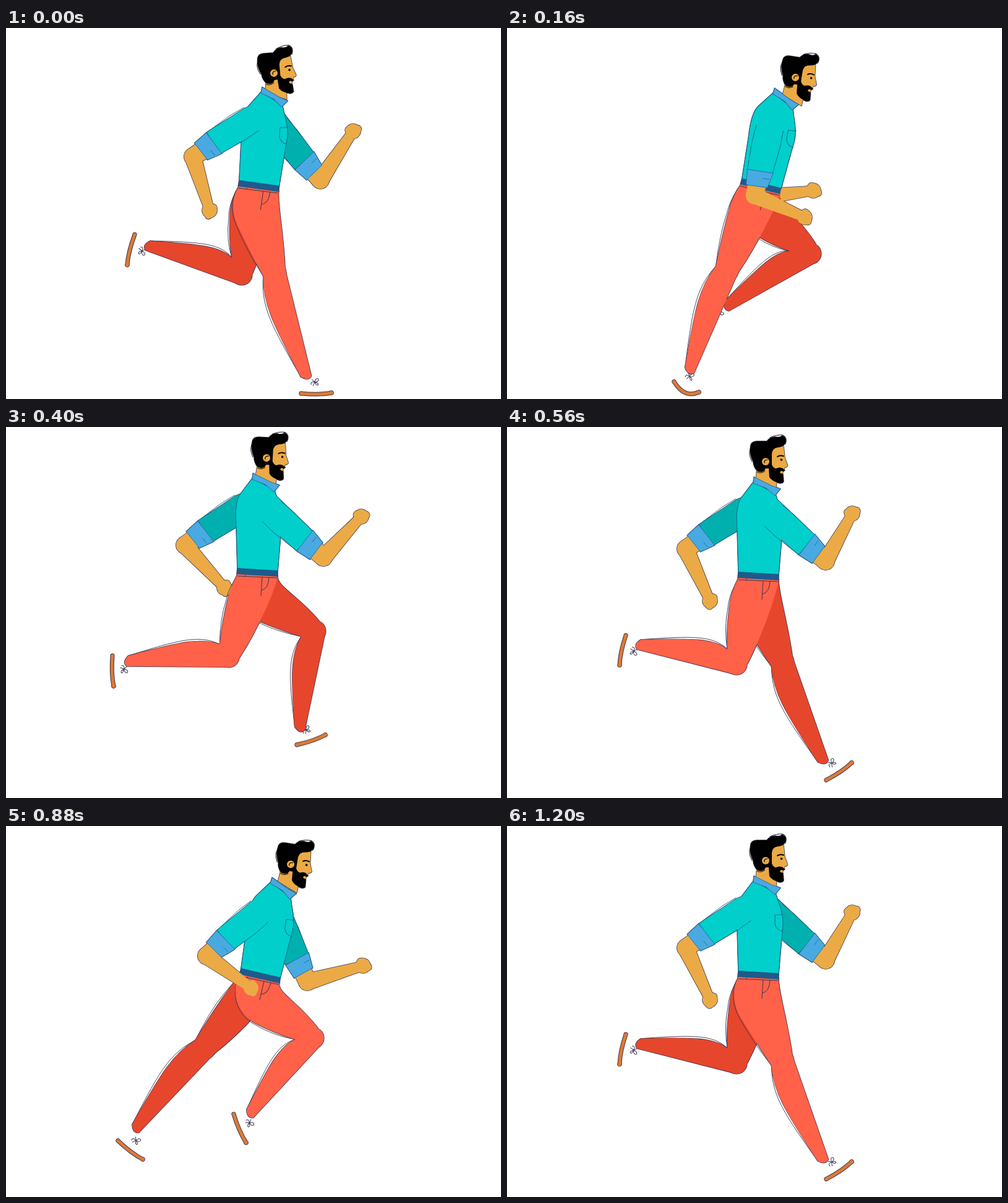
Animation of 800x600 px, one loop 1280 ms. Source, as an HTML page with a canvas:

```html
<!DOCTYPE html>
<html>
<head>
<meta charset="utf-8">
<title>Running man</title>
<style>
html, body { margin: 0; width: 100%; height: 100%; overflow: hidden; background: #fff; }
canvas { display: block; }
</style>
</head>
<body>
<canvas id="c" width="800" height="600"></canvas>
<script>
const ctx = document.getElementById('c').getContext('2d');
const STEPS = 16, STEP_MS = 80;
const TEAL = '#00cfcb', TEAL_DARK = '#00b0ae', CUFF = '#48aae0', BELT = '#1f5a8c', SKIN = '#ebaa45',
  PANTS = '#ff6248', PANTS_DARK = '#e6462c', SOLE = '#de7a34', SEAM = '#1d6d90', INK = '#3a3654';

// Rows start with their step; both sides run the same cycle half a turn apart.
// knee, ankle
const LEG = [
  [0, 436, 396, 485, 565], [1, 413, 408, 380, 568], [2, 357, 393, 294, 555], [3, 322, 360, 208, 490],
  [5, 360, 372, 195, 378], [7, 371, 384, 212, 351], [8, 381, 399, 228, 351], [9, 425, 409, 268, 378],
  [10, 491, 365, 354, 450], [11, 497, 343, 393, 466], [13, 500, 330, 474, 489], [15, 447, 380, 511, 542]];
// heel, toe, bend of the sole
const FOOT = [
  [0, 477, 591, 526, 590, 2], [1, 369, 591, 419, 590, 2], [2, 270, 572, 310, 589, 11], [3, 181, 509, 221, 539, 2],
  [5, 172, 370, 174, 419, 2], [7, 192, 337, 182, 385, 2], [8, 208, 334, 196, 383, 2], [9, 248, 363, 235, 411, 2],
  [10, 323, 440, 330, 487, 2], [11, 368, 466, 388, 512, 2], [13, 470, 514, 516, 498, 2], [15, 516, 571, 557, 543, 2]];
// elbow, fist
const ARM = [
  [0, 302, 208, 329, 295], [1, 324, 233, 362, 317], [2, 400, 271, 481, 306], [3, 487, 252, 577, 226],
  [5, 513, 211, 574, 145], [7, 515, 217, 558, 140], [8, 508, 246, 561, 167], [9, 487, 276, 550, 212],
  [10, 404, 274, 495, 263], [11, 324, 210, 396, 262], [13, 289, 191, 353, 260], [15, 289, 197, 328, 281]];
// belt corner, lean, ear, head tilt; twice per cycle
const BODY = [
  [0, 377, 246, 4.5, 433, 73, -5], [1, 380, 253, 9.5, 453, 87, -5], [2, 380, 243, 10.5, 466, 80, 9],
  [3, 380, 230, 9.5, 460, 62, 9], [5, 374, 228, 0, 421, 50, 3], [7, 374, 234, 0, 418, 56, 0]];

// Smooth periodic curve through the rows
function sample(rows, period, t) {
  const n = rows.length;
  t = (t % period + period) % period;
  const row = i => {
    const turn = Math.floor(i / n), r = rows[i - turn * n];
    return [r[0] + turn * period, ...r.slice(1)];
  };
  let i = n - 1;
  while (rows[i][0] > t) i--;
  const [a, b, c, d] = [-1, 0, 1, 2].map(k => row(i + k));
  const h = c[0] - b[0], s = (t - b[0]) / h;
  return b.slice(1).map((p, j) => {
    j++;
    const m = (c[j] - a[j]) / (c[0] - a[0]) * h, q = (d[j] - b[j]) / (d[0] - b[0]) * h;
    return p + s * m + s * s * (3 * (c[j] - p) - 2 * m - q) + s * s * s * (2 * (p - c[j]) + m + q);
  });
}

// Limb frame: origin at the lower joint, x towards the upper one, y towards the front
function bone(ox, oy, tx, ty) {
  const len = Math.hypot(tx - ox, ty - oy), ux = (tx - ox) / len, uy = (ty - oy) / len;
  return { len, ux, uy, at: (x, y) => [ox + ux * x - uy * y, oy + uy * x + ux * y] };
}

let parts;
function add(path, fill, line, width = 1, halo = true) {
  parts.push({ m: ctx.getTransform(), path: typeof path === 'string' ? new Path2D(path) : path, fill, line, width, halo });
}
const poly = (pts, close = true) =>
  new Path2D('M' + pts.map(p => p.join(' ')).join('L') + (close ? 'Z' : ''));
function disc(x, y, r) {
  const p = new Path2D();
  p.arc(x, y, r, 0, 7);
  return p;
}
const at = (ox, oy, deg, px, py, draw) => {
  ctx.save();
  ctx.translate(ox, oy);
  ctx.rotate(deg * Math.PI / 180);
  ctx.translate(-px, -py);
  draw();
  ctx.restore();
};

function foot(t) {
  const [hx, hy, tx, ty, bend] = sample(FOOT, STEPS, t);
  const f = bone(hx, hy, tx, ty), a = Math.atan2(ty - hy, tx - hx) * 180 / Math.PI;
  const sole = new Path2D();
  sole.moveTo(hx, hy);
  sole.quadraticCurveTo(...f.at(f.len * .6, bend * 1.7), tx, ty);
  add(sole, null, INK, 7, false);
  add(sole, null, SOLE, 5, false);
  add(disc(tx, ty, 3), SOLE);
  add(disc(hx, hy, 2.6), SOLE);
  at(...f.at(f.len / 2 - 2, -18), a, 0, 0, () =>
    add('M-6 4Q-7 -1 -2 0Q4 1 6 -3Q6 -7 2 -5L-3 6M-4 -4L1 1Q7 2 5 5Q1 5 0 0', null, INK, 1, false));
}

function leg(t, torso, fill) {
  const [kx, ky, ax, ay] = sample(LEG, STEPS, t);
  const thigh = bone(kx, ky, ...torso(405, 262)), shin = bone(ax, ay, kx, ky);
  const L = shin.len, lean = thigh.ux;
  const vx = -thigh.uy - shin.uy, vy = thigh.ux + shin.ux;
  const w = 21 / (1 + thigh.ux * shin.ux + thigh.uy * shin.uy);
  const hollow = [kx - vx * w, ky - vy * w];
  // Calf and back of the thigh, pushed out by d
  const back = (p, d) => {
    p.bezierCurveTo(...shin.at(L - 80, -26 - d), ...shin.at(L - 46, -34 - d), ...hollow);
    p.quadraticCurveTo(...thigh.at(50, -32 + 4 * lean - d), ...thigh.at(85, -38 + 8 * lean - d / 2));
    p.bezierCurveTo(...thigh.at(108 - 28 * lean, -43 + 15 * lean - d / 2), ...torso(365, 261), ...torso(374, 244));
  };
  foot(t);
  const edge = new Path2D();
  edge.moveTo(...shin.at(3, -8));
  back(edge, 4.5);
  add(edge, null, INK, .9, false);
  const p = new Path2D();
  p.moveTo(...torso(439, 247));
  p.bezierCurveTo(...torso(438, 264), ...thigh.at(60, 28), ...thigh.at(6, 17));
  p.lineTo(...shin.at(L - 4, 16));
  p.lineTo(...shin.at(0, 9));
  p.quadraticCurveTo(...shin.at(-8, 2), ...shin.at(3, -8));
  back(p, 0);
  p.closePath();
  add(p, fill);
  add(disc(kx, ky, 16.8), fill);
}

function arm(t, torso, fill) {
  const [ex, ey, fx, fy] = sample(ARM, STEPS, t);
  const up = bone(ex, ey, ...torso(405, 120)), low = bone(fx, fy, ex, ey);
  const local = list => list.map(p => up.at(...p));
  add(poly([low.at(low.len, 13.5), low.at(8, 8), low.at(8, -8), low.at(low.len, -13.5)]), SKIN);
  add(poly(local([[0, 14], [22, 15], [22, -15], [0, -14]])), SKIN);
  add(disc(ex, ey, 14.2), SKIN);
  add(disc(fx, fy, 12), SKIN);
  add(disc(...low.at(2, 7), 6), SKIN);
  add(disc(...low.at(-7, -4), 6), SKIN);
  add(poly(local([[40, 20], [122, 23], [140, 15], [140, -15], [112, -21], [40, -21]])), fill);
  for (const s of [20, -21])
    add(poly(local([[40, s], [86, s * 1.13], [112, s * 1.08]]), false), null, SEAM, 1, false);
  add(poly(local([[42, 21], [39, -21], [14, -17], [17, 17]])), CUFF, '#2b6ea6');
  add(poly(local([[30, 7], [31, 17]]), false), null, '#2b6ea6', 1, false);
}

function head() {
  add('M404 66L402 86L435 100L436 82Z', SKIN);
  add('M422 36L447 31L449 50L453.5 62Q453 65 449 65L446 72L444 85L420 76L412 66Z', SKIN);
  add('M394 29Q396 23 404 23L420 23Q425 16 434 16Q441 18 445 14Q452 17 450 25Q447 32 438 33Q429 34 428 43' +
    'L428 61Q431 67 435 67Q441 64 446 67L449 70L446 72Q442 69 441 74L446 76L447 88Q446 91 441 91' +
    'Q428 88 424 81L423 67L418 67Q415 75 405 72Q398 64 398 56Q391 43 394 29Z', '#000');
  add(disc(418, 56, 6), SKIN, null, 1, false);
  add('M416 58Q415 53 421 53', null, '#000', 1.2, false);
  add('M437 48Q441 45 447 47', null, '#000', 2, false);
  add(disc(443.5, 53, 1.8), '#000', null, 1, false);
  add('M395 33Q390 39 393 49L396 56M425 17Q436 12 446 13Q454 17 450 28M404 73Q410 76 416 72', null, '#000', .9, false);
}

function shirt() {
  add('M374 236L372 165Q369 127 379 114L398 89L434 108L438 121Q447 145 446 160L444 180L439 240Z', TEAL, SEAM);
  add('M446 143L433 144L433 159Q436 169 446 170', null, SEAM, 1, false);
  add('M374 234L439 238L439 248L373 244Z', BELT);
  add('M374 247L438 250M387 246L387 248M414 249L412 279M425 250Q424 268 413 270', null, INK, 1, false);
  add('M399 81L398 91L419 99L433 111L442 100L428 95Z', CUFF, '#2b6ea6');
}

function draw(step) {
  const [bx, by, lean, ex, ey, tilt] = sample(BODY, STEPS / 2, step);
  const r = lean * Math.PI / 180, cos = Math.cos(r), sin = Math.sin(r);
  const torso = (x, y) => [bx + (x - 374) * cos - (y - 234) * sin, by + (x - 374) * sin + (y - 234) * cos];
  parts = [];
  arm(step + 8, torso, TEAL_DARK);
  leg(step + 8, torso, PANTS_DARK);
  leg(step, torso, PANTS);
  at(ex, ey, tilt, 418, 56, head);
  at(bx, by, lean, 374, 234, shirt);
  arm(step, torso, TEAL);

  ctx.fillStyle = '#fff';
  ctx.fillRect(0, 0, 800, 600);
  ctx.save();
  ctx.lineJoin = ctx.lineCap = 'round';
  // A thin outline under everything shows only around the silhouette
  ctx.strokeStyle = INK;
  ctx.lineWidth = 1.6;
  for (const p of parts) if (p.halo) {
    ctx.setTransform(p.m);
    ctx.stroke(p.path);
  }
  for (const p of parts) {
    ctx.setTransform(p.m);
    if (p.fill) {
      ctx.fillStyle = p.fill;
      ctx.fill(p.path);
    }
    if (p.line) {
      ctx.strokeStyle = p.line;
      ctx.lineWidth = p.width;
      ctx.stroke(p.path);
    }
  }
  ctx.restore();
}

const start = performance.now();
function tick() {
  draw(Math.floor((performance.now() - start) / STEP_MS) % STEPS);
  requestAnimationFrame(tick);
}
tick();
</script>
</body>
</html>
```
